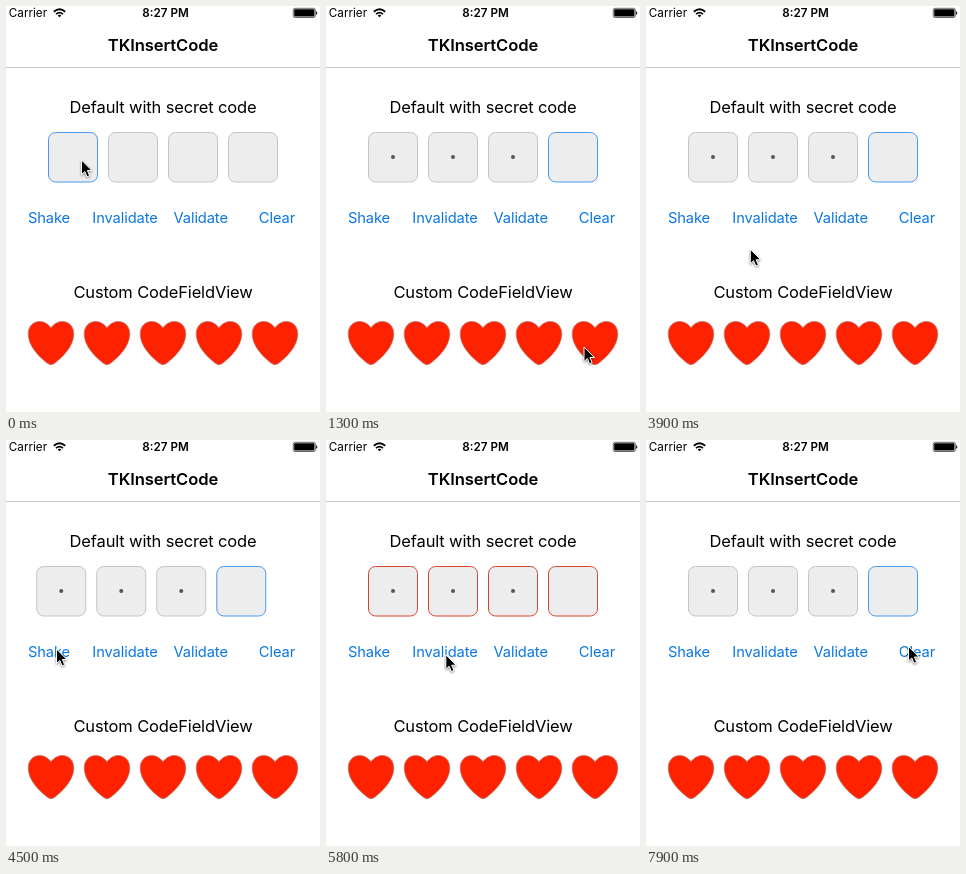
An HTML page for the animation above (8000 ms loop, 314 by 406 pixels).

```html
<!DOCTYPE html>
<html lang="en">
<head>
<meta charset="utf-8">
<title>TKInsertCode</title>
<style>
  html, body { margin: 0; width: 100%; height: 100%; overflow: hidden; background: #fff; }
  svg { display: block; width: 314px; height: 406px; font-family: Inter, sans-serif; }
  .mid { text-anchor: middle; }
  .label { font-size: 16.5px; letter-spacing: -.15px; }
  .title { font-size: 16.6px; font-weight: 600; letter-spacing: -.1px; }
  .status { font-size: 11.7px; }
  .link { font-size: 14.7px; letter-spacing: -.1px; fill: #0a76e4; }
  #arrow { filter: drop-shadow(.5px 1px .8px #0007); }
</style>
</head>
<body>
<svg viewBox="0 0 314 406">
  <rect y="61" width="314" height="1" fill="#c8c8c8"/>
  <text class="status" x="2.8" y="11">Carrier</text>
  <path d="M47.8 5.8Q53.5 .8 59.2 5.8M50 8.1Q53.5 5.1 57 8.1" fill="none" stroke="#000" stroke-width="1.8"/>
  <path d="M51.7 9.4Q53.5 7.9 55.3 9.4L53.5 11.2Z"/>
  <text class="status mid" x="159.5" y="11" font-weight="600">8:27 PM</text>
  <rect x="287.3" y="2.3" width="22" height="9.2" rx="1.8" fill="none" stroke="#000" stroke-width=".6"/>
  <rect x="288.2" y="3.2" width="20.2" height="7.4" rx="1"/>
  <path d="M310.2 5Q312.5 7 310.2 9Z"/>
  <text class="title mid" x="157" y="45">TKInsertCode</text>
  <text class="label mid" x="157" y="107">Default with secret code</text>
  <g id="cells" fill="#ededed"></g>
  <text class="link mid" x="43" y="217">Shake</text>
  <text class="link mid" x="119" y="217">Invalidate</text>
  <text class="link mid" x="194.7" y="217">Validate</text>
  <text class="link mid" x="271" y="217">Clear</text>
  <text class="label mid" x="157" y="292.3">Custom CodeFieldView</text>
  <g id="hearts" fill="#ff2200" stroke="#b9776c" stroke-width=".7"></g>
  <g id="cursor">
    <circle id="ring" cx=".5" cy="2.5" r="19.8" fill="none" stroke="#000" stroke-width="3"/>
    <path id="arrow" d="M0 0V14.6L3.3 11.5 5.5 16.8 8.1 15.7 5.9 10.5H10.4Z" stroke="#fff"/>
  </g>
</svg>
<script>
const LOOP = 8000, STEP = 100;
const byId = id => document.getElementById(id);
const repeat = (n, make) => Array.from({ length: n }, (_, i) => make(i)).join('');

const HEART = 'M0 7C-3 2-8 .5-11.5 .5C-18 .5-22.8 5.5-22.8 13C-22.8 25-12 36-3 42.7Q0 44.8 3 42.7' +
  'C12 36 22.8 25 22.8 13C22.8 5.5 18 .5 11.5 .5C8 .5 3 2 0 7Z';
byId('hearts').innerHTML = repeat(5, i => `<path d="${HEART}" transform="translate(${45 + 56 * i} 315)"/>`);
byId('cells').innerHTML = repeat(4, i => `<g transform="translate(${42 + 60 * i} 126)">
  <rect x=".5" y=".5" width="49" height="49.5" rx="7"/><circle cx="25" cy="25" r="2" fill="#555"/></g>`);
const cells = [...byId('cells').children];

const HOME = { x: 75.5, y: 154 };
const MOVES = [
  { start: 0, end: 900, x: 258, y: 341 },
  { start: 3300, end: 4200, x: 50.5, y: 209 },
  { start: 4600, end: 5300, x: 106, y: 215.5 },
  { start: 5600, end: 6400, x: 194.5, y: 210.5 },
  { start: 7000, end: 7500, x: 262.5, y: 206.5 }
];
const KEY_TIMES = [900, 1100, 1300, 1700], ERASE = 3200;
const CLICKS = [4300, 5500, 6500], CLICK_LENGTH = 200;
const SHAKE = 4335, INVALID = 5600, VALID = 6700;

const within = (t, from, to) => t >= from && t < to;
const show = (el, on) => el.setAttribute('visibility', on ? 'visible' : 'hidden');

function ease(t, { start, end }) {
  const u = Math.min(1, Math.max(0, (t - start) / (end - start)));
  return u * u * (3 - 2 * u);
}

function cursorAt(t) {
  return MOVES.reduce((at, move) => {
    const k = ease(t, move);
    return { x: at.x + (move.x - at.x) * k, y: at.y + (move.y - at.y) * k };
  }, HOME);
}

// Side-to-side swing that dies out over 600 ms
function shakeAt(t) {
  const age = t - SHAKE;
  return within(age, 0, 600) ? -20 * (1 - age / 600) * Math.cos(2 * Math.PI * age / 150) : 0;
}

function draw(now) {
  const t = Math.floor(now % LOOP / STEP) * STEP;
  const count = KEY_TIMES.filter(k => k <= t).length - (t >= ERASE);
  const invalid = within(t, INVALID, VALID);
  cells.forEach((cell, i) => {
    const [box, dot] = cell.children;
    box.setAttribute('stroke', invalid ? '#d8452e' : i === count ? '#4898ee' : '#c4c4c4');
    show(dot, i < count);
  });
  const { x, y } = cursorAt(t);
  byId('cells').setAttribute('transform', `translate(${shakeAt(t)} 0)`);
  byId('cursor').setAttribute('transform', `translate(${x} ${y})`);
  show(byId('ring'), CLICKS.some(c => within(t, c, c + CLICK_LENGTH)));
}

let start;
function tick(now) {
  start ??= now;
  draw(now - start);
  requestAnimationFrame(tick);
}
draw(0);
requestAnimationFrame(tick);
</script>
</body>
</html>
```
